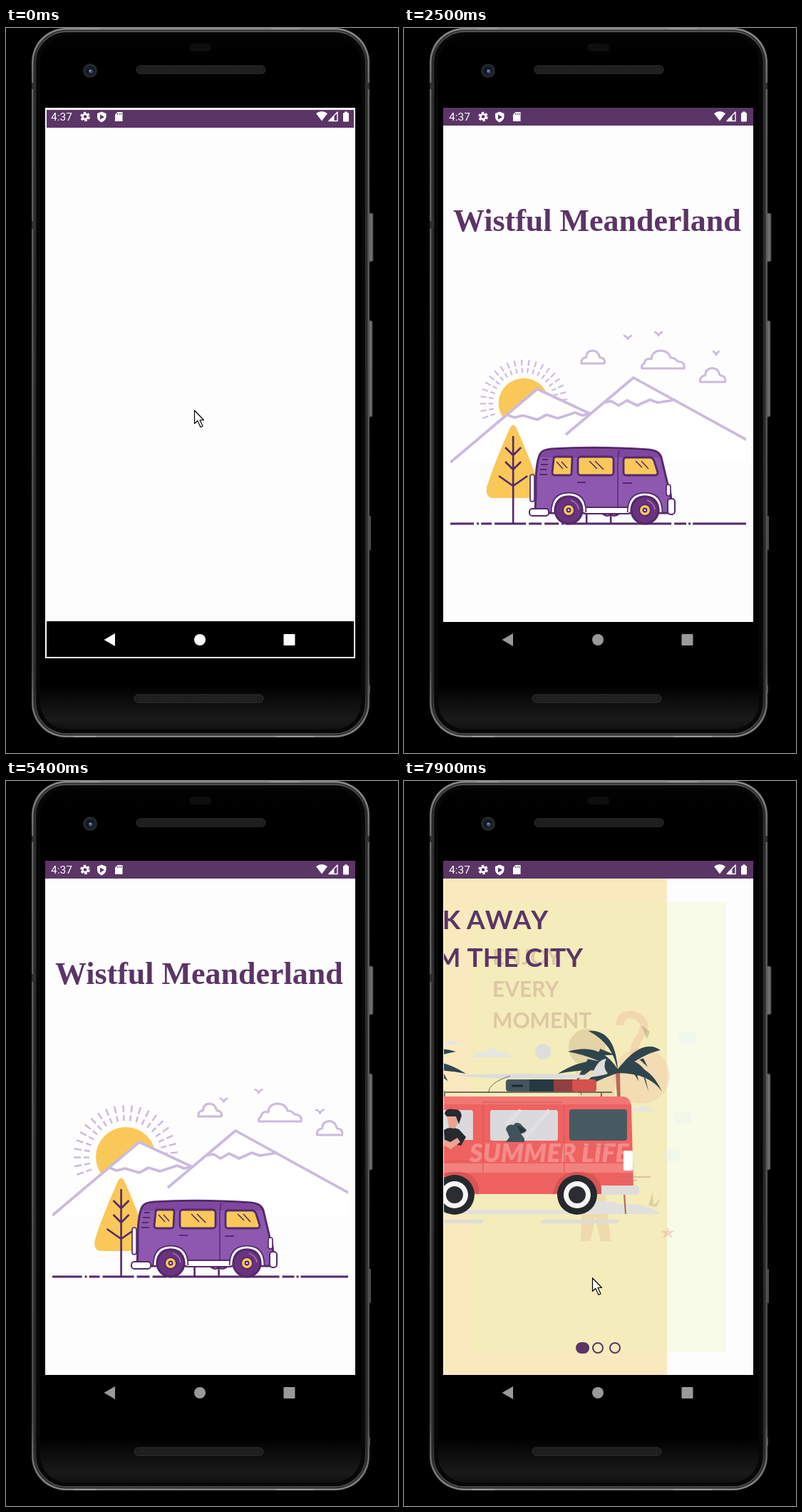
These frames come from a looping animation (550x1018 px, 8000 ms). An HTML page with a canvas:

```html
<!DOCTYPE html>
<html lang="en">
<head>
<meta charset="utf-8">
<title>Travel app</title>
<style>
html, body { margin: 0; width: 100%; height: 100%; overflow: hidden; background: #000; }
canvas { display: block; }
</style>
</head>
<body>
<canvas id="stage" width="550" height="1018"></canvas>
<script>
const ctx = document.getElementById('stage').getContext('2d');
const LOOP = 8000, STEP = 100;
const PURPLE = '#5b3566', INK = '#54296a', LILAC = '#cbbade', GOLD = '#f9c859';
const TAU = Math.PI * 2;

const clamp = v => Math.max(0, Math.min(1, v));

// Linear interpolation through [time, value] pairs
function track(t, keys) {
  if (t <= keys[0][0]) return keys[0][1];
  for (let i = 1; i < keys.length; i++) {
    const [a, va] = keys[i - 1], [b, vb] = keys[i];
    if (t <= b) return va + (vb - va) * (t - a) / (b - a);
  }
  return keys[keys.length - 1][1];
}

function paint(p, fill, stroke, width = 2) {
  if (fill) { ctx.fillStyle = fill; ctx.fill(p); }
  if (stroke) { ctx.strokeStyle = stroke; ctx.lineWidth = width; ctx.stroke(p); }
}
const path = (d, ...style) => paint(new Path2D(d), ...style);
function box(x, y, w, h, r, ...style) {
  const p = new Path2D();
  p.roundRect(x, y, w, h, r);
  paint(p, ...style);
}
function oval(x, y, rx, ry, turn, ...style) {
  const p = new Path2D();
  p.ellipse(x, y, rx, ry, turn, 0, TAU);
  paint(p, ...style);
}
const disc = (x, y, r, ...style) => oval(x, y, r, r, 0, ...style);
function text(s, x, y, font, color) {
  ctx.font = font;
  ctx.fillStyle = color;
  ctx.fillText(s, x, y);
}
function at(x, y, draw, scale = 1) {
  ctx.save();
  ctx.translate(x, y);
  ctx.scale(scale, scale);
  draw();
  ctx.restore();
}
function clipped(x, y, w, h, draw) {
  ctx.save();
  ctx.beginPath();
  ctx.rect(x, y, w, h);
  ctx.clip();
  draw();
  ctx.restore();
}
function fade(x0, y0, x1, y1, stops) {
  const g = ctx.createLinearGradient(x0, y0, x1, y1);
  stops.forEach(([k, c]) => g.addColorStop(k, c));
  return g;
}

function speaker(x, y) {
  box(x, y, 181, 11, 5.5, '#1c1c1c', '#353535', 1);
  ctx.setLineDash([1, 2]);
  path(`M${x + 6} ${y + 4}h169M${x + 6} ${y + 7}h169`, null, '#3b3b3b', 1);
  ctx.setLineDash([]);
}

function phone() {
  ctx.fillStyle = '#000';
  ctx.fillRect(0, 0, 550, 1018);
  box(508, 260, 7, 68, 2, '#6d6d6d', '#333', 1);
  box(508, 411, 6, 135, 2, '#6d6d6d', '#333', 1);
  box(508, 685, 4, 48, 1, '#4d4d4d');
  box(508, 922, 3, 12, 1, '#4d4d4d');
  box(36, 0, 474, 996, 48, fade(0, 0, 0, 996,
    [[0, '#8a8a8a'], [.1, '#606060'], [.9, '#4a4a4a'], [1, '#858585']]));
  box(38.500, 2.500, 469, 991, 46, '#2b2b2b');
  box(41.500, 5, 463, 986, 43, '#070707', fade(0, 0, 0, 996,
    [[0, '#6a6a6a'], [.04, '#303030'], [.93, '#262626'], [1, '#555']]), 1.5);
  box(48, 10, 450, 975, 38, fade(0, 0, 0, 996,
    [[0, '#040404'], [.04, '#000'], [.925, '#000'], [.975, '#1a1a1a'], [1, '#080808']]));
  for (const [x, y, h] of [[36, 77, 9], [504, 77, 9], [36, 271, 11]]) box(x, y, 6, h, 0, '#303030');
  path('M103 1H132M371 1H412M95 995H127M378 995H432', null, '#999', 2);
  box(257, 22, 31, 11, 5, '#0e0e0e');
  speaker(183, 53);
  speaker(180, 936);
  disc(118, 60, 10, '#26272b');
  disc(118, 60, 6.5, '#111827');
  disc(119, 61, 3, '#3c4868');
  disc(118, 60, 1.3, '#9aa6c4');
}

function statusIcons() {
  text('4:37', 63, 130, '15.5px Roboto, sans-serif', '#fff');
  const w = '#fff';
  ctx.setLineDash([3, 2.24]);
  disc(111, 124.5, 5, null, w, 3.6);
  ctx.setLineDash([]);
  disc(111, 124.5, 3.6, null, w, 2.6);
  path('M134 117.5L140.500 120V125Q140 130 134 132.500Q128 130 128 125V120Z', w);
  path('M132 121.500L138 125L132 128.500Z', PURPLE);
  path('M156.500 118H163.500V131H153V121.500Z', w);
  path('M156.500 119.500V122M159 119.500V122M161.500 119.500V122', null, PURPLE, 1);
  path('M435 120Q443 114 451 120L443 130.500Z', w);
  path('M465 118V130.500H453Z', null, w, 1.4);
  path('M460.500 123V130.500H453Z', w);
  box(473, 119, 8, 12.500, 1, w);
  box(475, 117.500, 4, 2, 0, w);
}

function navIcons(c) {
  path('M153 850V868L137.500 859Z', c);
  disc(272, 859, 8, c);
  box(389.500, 851, 16, 16, 1, c);
}

function leaf(x, y, side, fill, size) {
  oval(x + side * size * .58, y, size * .54, size * .3, -side * .5, fill, INK, 2.4);
}

function plant(x, top, rows, fill) {
  path(`M${x} ${top + 4}V696`, null, INK, 2.6);
  for (let i = 0; i < rows; i++)
    for (const side of [-1, 1]) leaf(x, top + 6 + i * 13, side, fill, 13);
}

function tree(x) {
  at(x, 0, () => {
    path('M0 557Q4 559 6 565Q30 620 37 645Q39 660 28 660H-28Q-39 660 -37 645Q-30 620 -6 565Q-4 559 0 557Z', GOLD);
    path('M0 573V696M-11 589L0 600L11 589M-11 609L0 620L11 609M-20 629L0 643L20 629', null, INK, 2.6);
  });
}

const cloud = (x, y, s) => at(x, y, () =>
  path('M-17 0H17Q19 -8 10 -9Q8 -19 -1 -19Q-10 -18 -10 -9Q-18 -8 -17 0Z', '#fff', LILAC, 3 / s), s);
const bigCloud = (x, y) => at(x, y, () =>
  path('M-29 0H30Q32 -9 21 -10Q17 -15 11 -15Q8 -25 -4 -25Q-15 -24 -16 -13Q-25 -15 -26 -7Q-31 -4 -29 0Z', '#fff', LILAC, 3));
const bird = (x, y, dip, s = 6) =>
  path(`M${x - s} ${y - dip}Q${x - 2} ${y - dip} ${x} ${y + 1}Q${x + 2} ${y - dip} ${x + s} ${y - dip}`, null, LILAC, 2.6);

function sun(t) {
  const size = 1 - Math.pow(1 - clamp((t - 1400) / 2400), 3);
  if (size <= 0) return;
  at(168, 522 + 6 * size, () => {
    disc(0, 0, 42, GOLD);
    for (let i = 0; i < 23; i++) {
      const a = -3.49 + i * .17, c = Math.cos(a), s = Math.sin(a);
      for (const [r0, r1] of [[51, 59], [63, 73]])
        path(`M${c * r0} ${s * r0}L${c * r1} ${s * r1}`, null, LILAC, 2.5);
    }
  }, size);
}

function mountains() {
  path('M65 610L187 507L262 542L230 610Z', '#fff');
  path('M65 610L187 507L262 542M145 543L155 547L167 544L187 550L200 543L216 548L240 540L250 544L262 541', null, LILAC, 3.7);
  path('M227 571L322 491L480 578V610H227Z', '#fff');
  path('M227 571L322 491L482 579M280 526L291 524L301 530L313 523L327 530L345 522L356 526L381 522', null, LILAC, 3.7);
}

function ground(tree0) {
  ctx.fillStyle = INK;
  ctx.fillRect(65, 694.500, 415, 3);
  ctx.fillStyle = '#fff';
  const gaps = [[-55, 4], [-48, 3], [-30, 4], [18, 4], [40, 4], [64, 4], [71, 3], [222, 4], [243, 3], [249, 3]];
  for (const [x, w] of gaps)
    for (const lap of [-415, 0, 415]) ctx.fillRect(tree0 + x + lap, 694, w, 4);
}

function camper() {
  path('M184 681L185 655Q184 612 191 598Q194 592 207 591Q270 587 343 592Q358 593 361 603L370 641Q376 650 375 681Z', '#8e58b0', INK, 3);
  path('M190 603Q194 594 207 593Q270 589 342 594Q356 595 359 603Z', '#7f479f');
  path('M302 593Q299 604 300 625V674', null, INK, 1.5);
  path('M194 606H202M192 613H202M191 620H200M190 627H201M243 638H255M307 639H320', null, INK, 2.2);
  path('M213 602H234Q236 602 236 605L235 625Q235 628 232 628H212Q208 628 208 624L210 605Q210 602 213 602Z', GOLD, INK, 2.8);
  box(244, 602, 50, 26, 4, GOLD, INK, 2.8);
  path('M312 603H345Q349 603 351 608L356 624Q356 628 352 628H312Q308 628 308 624V607Q308 603 312 603Z', GOLD, INK, 2.8);
  path('M214 609L223 619M221 609L229 618M260 608L271 619M268 608L280 620M325 608L334 617M333 608L343 619', null, INK, 1.5);
  box(177, 627, 6, 38, 3, '#fff', INK, 1.7);
  box(368, 641, 6, 16, 3, '#fff', INK, 1.7);
  box(370, 661, 10, 22, 4, '#fff', INK, 2);
  box(176, 675, 27, 10, 4, '#fff', INK, 2);
  box(252, 673, 65, 9, 3, '#fff', INK, 2);
  for (const x of [231, 338]) {
    const arch = `M${x - 22} 680Q${x - 22} 655 ${x} 655Q${x + 22} 655 ${x + 22} 680`;
    path(arch, null, INK, 6.5);
    path(arch, null, '#fff', 3);
    disc(x, 677, 19, '#6a337f', INK, 3);
    disc(x, 677, 8, GOLD, INK, 2);
    disc(x, 677, 3.4, INK);
    disc(x, 677, 1.3, '#fff');
    path(`M${x + 3} 663Q${x + 13} 667 ${x + 14} 676`, null, '#b58bca', 1.2);
  }
}

function splash(t) {
  text('Wistful Meanderland', 69, 285, 'bold 44px "Liberation Serif", serif', PURPLE);
  clipped(65, 415, 415, 295, () => {
    const drift = track(t, [[1000, -5], [1700, 0], [3300, 12], [4600, 23], [6200, 31]]);
    const first = ((265.3 - .1402 * (t - 1700)) % 415 + 415) % 415;
    const rise = keys => track(t, [1700, 3300, 4600, 6200].map((k, i) => [k, keys[i]]));
    const flap = 2.5 + 1.5 * Math.sin(t / 120);
    sun(t);
    mountains();
    cloud(259 + drift, 471, .95);
    bigCloud(357 + drift, 478);
    cloud(427 + drift, 497, 1.03);
    bird(rise([319, 309, 306, 305]), rise([428, 444, 449, 450]), flap);
    bird(rise([358, 356, 355, 354]), rise([430, 432, 437, 437]), flap);
    bird(rise([438, 438, 441, 440]), rise([455, 461, 465, 466]), flap, rise([4, 6, 6, 7]));
    ground(first);
    for (const lap of [-415, 0, 415]) {
      tree(first + lap);
      plant(first + lap + 103, 626, 4, GOLD);
      plant(first + lap + 137, 648, 3, '#fff');
    }
    camper();
  });
}

function palm(x, flip) {
  path(`M${x - 3} 408Q${x + 1} 480 ${x - 10 * flip} 608H${x + 4 - 8 * flip}Q${x + 4} 480 ${x + 3} 408Z`, '#b9685a');
  ctx.save();
  ctx.translate(x, 407);
  ctx.scale(flip, 1);
  const fronds = [[-34, -40, -60, -29], [-18, -22, -42, 4], [-40, -12, -62, 29], [4, -52, 41, -56],
    [24, -34, 70, -27], [36, -20, 84, 4], [32, 0, 55, 30]];
  for (const [cx, cy, ex, ey] of fronds) {
    path(`M0 -2Q${cx} ${cy - 7} ${ex} ${ey}Q${cx * 1.1} ${cy + 15} 0 3Z`, '#2f454d');
    path(`M${cx * .9} ${cy * .55 + 6}L${ex * .7} ${ey * .6 + 12}L${ex * .6} ${ey * .5 - 3}Z`, '#2f454d');
  }
  ctx.restore();
}

const haze = (x, y, w) =>
  path(`M${x - w} ${y}Q${x - w * .6} ${y - w * .35} ${x - w * .3} ${y - w * .25}Q${x} ${y - w * .6} ${x + w * .3} ${y - w * .25}Q${x + w * .6} ${y - w * .3} ${x + w} ${y}Z`, '#e7e5e0');

function rider() {
  path('M177 490Q186 484 198 489L208 500L201 512L178 506Z', '#252a30');
  path('M200 507L187 517L158 502L155 495L165 498L186 507L196 501Z', '#eba494');
  path('M181 468L196 466Q199 480 192 488L184 487Z', '#eba494');
  path('M178 467Q180 459 190 461Q201 460 202 470L198 482L194 471L181 471Z', '#252a30');
}

const cityBack = () => box(56, 137, 434, 697, 0, '#fae8bf');

function cityTitle(loaded) {
  const [font, y1, y2] = loaded ? ['bold 37px Lato, sans-serif', 208, 261] : ['42px Roboto, sans-serif', 213, 263];
  ctx.fontKerning = loaded ? 'none' : 'auto';
  text('WALK AWAY', 91, y1, font, PURPLE);
  text('FROM THE CITY', 91, y2, font, PURPLE);
  ctx.fontKerning = 'auto';
}

function cityScene() {
  disc(316, 380, 11, '#dedddd');
  haze(245, 388, 30);
  haze(187, 370, 14);
  haze(98, 448, 24);
  haze(455, 464, 20);
  path('M64 608Q88 582 118 588Q150 586 176 602H350Q385 582 426 594Q462 592 480 608Z', '#e2e0dc');
  path('M126 616H235L230 621H122ZM317 616H424L419 621H312Z', '#dedcd8');
  palm(124, 1);
  palm(421, -1);
  path('M192 413Q290 409 385 413Q392 391 405 390Q399 401 407 411Q380 420 300 418Q225 418 192 413Z', '#dddddb');
  path('M270 414Q240 424 240 437M365 418L370 441', null, '#6a6867', 1);
  box(264, 419, 127, 17, 4, '#44565d');
  box(297, 419, 35, 17, 0, '#263940');
  box(331, 419, 27, 17, 0, '#8f403f');
  box(357, 419, 34, 17, 4, '#d5514c');
  path('M272 428H288', null, '#1d2b30', 3);
  path('M162 437H413M178 438V444M398 438V444', null, '#514442', 1.5);
  path('M146 443H426Q438 443 440 456L443 568Q443 580 432 580H110Q102 579 103 565L104 520L123 462Q129 445 146 443Z', '#ee6261');
  path('M146 443H426Q437 443 439 454H128Q133 445 146 443Z', '#f17674');
  path('M124 461H132L125 511H107Q107 501 113 486Z', '#dcdcde');
  path('M143 462H214Q218 462 218 466V504H136L139 466Q139 462 143 462Z', '#dadadd');
  box(242, 462, 95, 43, 3, '#dadadd');
  box(353, 461, 81, 44, 4, '#485a61');
  path('M155 462L139 490M285 462L265 482M325 462L292 500', null, '#e1e1e3', 5);
  oval(146, 497, 10, 12, .5, '#dc4b4d');
  rider();
  path('M264 489Q266 481 275 483Q277 478 284 481L293 490Q291 495 285 495L290 502V507H264L269 500Z', '#41535a');
  path('M279 483L293 490L285 495Z', '#273940');
  box(103, 537, 339, 13, 0, 'rgba(255,220,205,.25)');
  text('SUMMER LIFE', 213, 535, 'italic 900 36px Lato, sans-serif', 'rgba(255,205,200,.4)');
  path('M232 455V550M346 455V550M231 451H343M163 550Q168 530 210 534', null, '#d95455', 1);
  oval(101, 536, 4, 9, .1, '#fff');
  box(429, 519, 13, 28, 2, '#fff');
  path('M418 556H467M420 561H448M371 513H410', null, '#b47363', .7);
  box(96, 568, 68, 13, 5, '#dedddc');
  box(386, 568, 65, 13, 5, '#dedddc');
  for (const x of [192, 364]) {
    path(`M${x - 34} 580Q${x - 28} 548 ${x} 549Q${x + 29} 548 ${x + 34} 570L${x + 34} 580Z`, '#d95455');
    disc(x, 581, 28, '#25292d');
    disc(x, 581, 19, '#f8f7f5');
    disc(x, 581, 12, '#2a2e32');
  }
}

function momentPage() {
  box(96, 170, 356, 632, 0, '#e1f2ae');
  ['ENJOY', 'EVERY', 'MOMENT'].forEach((s, i) =>
    text(s, 124, 258 + i * 44.500, 'bold 30px Lato, sans-serif', '#a0686a'));
  for (const [x, y] of [[397, 361], [390, 473], [374, 525]]) box(x - 12, y - 9, 25, 18, 7, '#e6edf5');
  disc(257, 374, 26, '#b8906f');
  oval(333, 414, 40, 39, 0, '#f0b09e');
  path('M303 343Q303 327 320 328Q344 335 334 355Q316 376 328 396', null, '#f0a294', 11);
  path('M333 343L345 352L341 362Z', '#7e6760');
  path('M240 400Q270 385 298 405L288 520L280 560L290 646H276L268 610L262 646H248L252 520Z', '#e0a88e');
  path('M343 596L349 577L350 596L360 586L354 598Z', '#a98d52');
  path('M370 626L372 632L380 631L374 636L377 642L370 638L364 642L366 636L361 632L368 632Z', '#e47e85');
}

function onboarding(t) {
  const f = track(t, [[7700, 0], [7900, .279]]);
  const slide = draw => at(-434 * f, 0, draw);
  clipped(56, 137, 434, 697, () => {
    slide(cityBack);
    if (f > 0) {
      // The next page fades and grows between the backdrop and the artwork
      at(274, 486, () => {
        ctx.translate(-274, -486);
        ctx.globalAlpha = f;
        momentPage();
      }, (.75 + .25 * f) / .82);
    }
    slide(() => {
      cityTitle(t >= 6900);
      cityScene();
    });
    box(241, 788, 16 + 11 * f, 16, 8, PURPLE);
    for (const x of [272, 296]) disc(x, 796, 7, null, PURPLE, 2);
  });
}

function cursor(t) {
  if (t > 1300 && t < 7300) return;
  const early = t <= 1300;
  const x = early ? track(t, [[900, 264], [1300, 550]]) : track(t, [[7300, 530], [7600, 385], [7700, 385], [7900, 264]]);
  const y = early ? 537 : track(t, [[7300, 620], [7600, 698]]);
  at(x, y, () => path('M.5 0V18.500L4.800 14.500L9 23.500L12 22L8 13.500H13.500Z', '#fff', '#000', 1.2));
}

function draw(t) {
  phone();
  const opening = t < 200;
  box(55, 112, 435, opening ? 773 : 722, 0, '#fefdfe');
  if (opening) box(57, 833, 431, 50, 0, '#000');
  box(opening ? 57 : 55, opening ? 115 : 112, opening ? 431 : 435, 25, 0, PURPLE);
  statusIcons();
  navIcons(t < 1200 ? '#fff' : '#999');
  if (t >= 6400) onboarding(t);
  else if (t >= 1200) splash(t);
  cursor(t);
}

ctx.lineJoin = 'round';
function tick() {
  const t = performance.now() % LOOP;
  draw(Math.floor(t / STEP) * STEP);
  requestAnimationFrame(tick);
}
tick();
</script>
</body>
</html>
```
